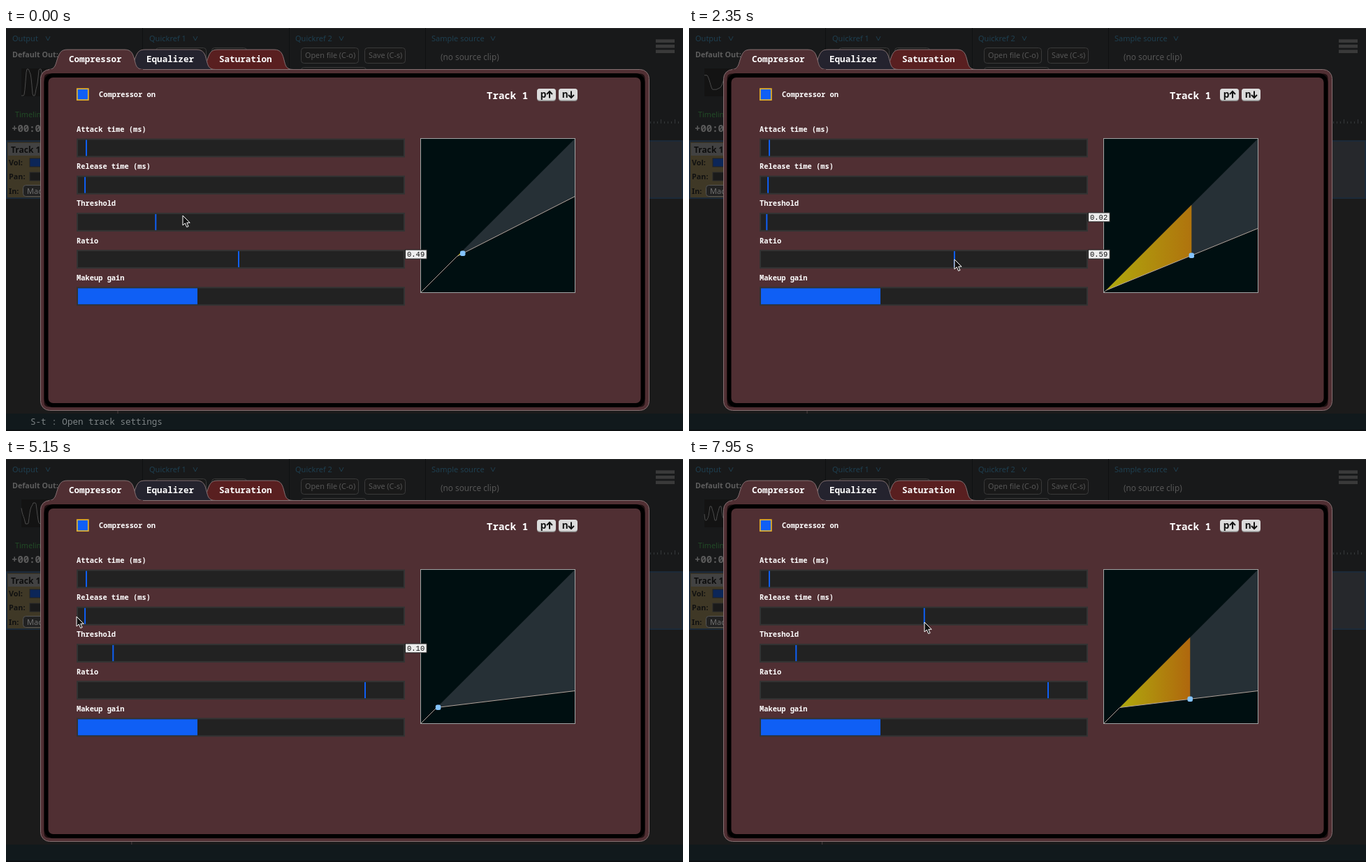
Write an HTML page that moves like this. It is 969 by 578 pixels and loops after 8 s.

```html
<!DOCTYPE html>
<html lang="en">
<head>
<meta charset="utf-8">
<title>Compressor panel</title>
<style>
html, body { margin: 0; width: 100%; height: 100%; overflow: hidden; background: #1b1b1b; }
svg { display: block; width: 100vw; height: 100vh; }
text { white-space: pre; }
.ui { font-family: "Noto Sans", "Open Sans", sans-serif; }
.mono { font-family: "Noto Sans Mono", "DejaVu Sans Mono", monospace; font-weight: 700; }
.tip { font-family: "Liberation Mono", monospace; }
</style>
</head>
<body>
<svg id="stage" viewBox="0 0 969 578" xmlns="http://www.w3.org/2000/svg"></svg>
<script>
const NS = "http://www.w3.org/2000/svg";
const stage = document.getElementById("stage");
const LOOP = 8000, STEP = 50;
const BROWN = "#502f33", BLUE = "#0f5ff5", EDGE = "#857173";

function set(node, attrs) {
  for (const k in attrs) node.setAttribute(k, attrs[k]);
  return node;
}
function add(tag, attrs, parent = stage) {
  return parent.appendChild(set(document.createElementNS(NS, tag), attrs));
}
function box(x, y, width, height, fill, more) {
  return add("rect", { x, y, width, height, fill, ...more });
}
function path(d, stroke, fill = "none", more) {
  return add("path", { d, stroke, fill, ...more });
}
function label(x, y, str, size, fill, cls = "mono", more) {
  const node = add("text", { x, y, "font-size": size, fill, class: cls, ...more });
  node.textContent = str;
  return node;
}

// Dimmed main window
box(0, 0, 969, 578, "#1b1b1b");
box(0, 0, 969, 161, "#18191a");
box(0, 0, 969, 1, "#2b2c2d");
for (const x of [195, 405, 600]) box(x, 0, 1, 60, "#0f1112");
[[9, "Output", 60], [205, "Quickref 1", 271], [414, "Quickref 2", 480], [609, "Sample source", 697]]
  .forEach(([x, name, arrow]) => {
    label(x, 19, name, 11, "#1e3f50", "ui");
    path(`M${arrow - 3} 12l3 6l3 -6`, "#1e3f50");
  });
label(9, 42, "Default Out:", 10.7, "#5e5e5e", "ui", { "font-weight": 700 });
label(622, 46, "(no source clip)", 11.8, "#565656", "ui");

function button(x, y, width, height, str) {
  box(x + .5, y + .5, width, height, "#191919", { rx: 4, stroke: "#3a3a3a" });
  if (str) label(x + 6, y + 15, str, 10.8, "#565656", "ui");
}
button(214, 28, 72, 23);
button(294, 28, 50, 23);
button(422, 28, 82, 22, "Open file (C-o)");
button(513, 28, 58, 22, "Save (C-s)");
button(422, 56, 93, 22);
for (const y of [16.3, 23.8, 31.3]) box(930, y, 27, 4.7, "#3a3a3a");

box(22, 58, 40, 40, "#131313");
const scope = path("", "#4b4b4b");
label(13, 128, "Timeline", 10.8, "#214a26", "ui");
label(8, 149, "+00:00", 14, "#5c5c5c");
for (let x = 922, i = 0; x < 967; x += 5, i++) box(x, i % 4 == 3 ? 131 : 134, 1, i % 4 == 3 ? 6 : 3, "#34383a");

// Track strip
box(1, 162, 967, 82, "#26282c", { stroke: "#1c2a39", "stroke-width": 2 });
box(2, 164, 60, 79, "#3f3826");
box(3, 165, 60, 18, "#424242");
label(7, 179, "Track 1", 12, "#0e0e0e", "ui", { "font-weight": 700 });
[["Vol:", 197], ["Pan:", 217], ["In:", 238]]
  .forEach(([s, y]) => label(4, y, s, 10.8, "#111111", "ui", { "font-weight": 700 }));
box(34, 187, 30, 12, "#0c2658", { stroke: "#222222" });
box(34, 207, 30, 12, "#1a1a1a", { stroke: "#2a2a2a" });
box(24.5, 225.5, 40, 16, "#222222", { rx: 4, stroke: "#555555" });
label(30, 238, "Mac", 11, "#707070", "ui");

// Status bar
box(0, 553, 969, 25, "#11191c");
box(0, 576, 969, 2, "#0c1012");
const playhead = box(160, 548, 1, 5, "#4d4143");
const status = label(35, 569, "S-t : Open track settings", 12.6, "#d5dadb", "mono", { style: "font-weight:500" });

// Tabs and dialog
function tab(x1, x2, fill) {
  path(`M${x1 - 13} 59.5C${x1 - 3} 59.5 ${x1 - 3} 51 ${x1} 43S${x1 + 5} 31 ${x1 + 14} 31` +
    `H${x2 - 14}C${x2 - 4} 31 ${x2 - 2} 38 ${x2} 46S${x2 + 3} 59.5 ${x2 + 13} 59.5`, EDGE, fill);
}
tab(289, 398, "#591f20");
tab(185, 287, "#24232e");
box(49.5, 59.5, 871, 489, BROWN, { rx: 13, stroke: EDGE });
tab(74, 184, BROWN);
box(62, 59, 134, 2, BROWN);
box(54.5, 65.5, 860, 478, "#1c0f10", { rx: 6 });
box(57.5, 68, 854, 473, BROWN, { rx: 10, stroke: "#000000", "stroke-width": 6 });
[[90, "Compressor"], [201, "Equalizer"], [305, "Saturation"]]
  .forEach(([x, s]) => label(x, 49, s, 12.6, "#ffffff"));

box(101.8, 87.2, 16, 16, BLUE, { stroke: "#e6b42c", "stroke-width": 1.7 });
label(133, 99, "Compressor on", 10.4, "#ffffff");
label(688, 102, "Track 1", 14.1, "#ffffff");
// Keys: letter, arrow tip and tail
[[760, "p", 91, 100.5], [791, "n", 100, 90.5]].forEach(([x, s, tip, tail]) => {
  box(x, 87, 27, 18, "#8d8d8d", { rx: 4 });
  box(x, 87, 27, 16.5, "#dcdcdc", { rx: 4 });
  label(x + 5, 100, s, 14, "#111111");
  const back = tip + Math.sign(tail - tip) * 4;
  path(`M${x + 18} ${tail}V${tip}M${x + 14} ${back}L${x + 18} ${tip}L${x + 22} ${back}`,
    "#111111", "none", { "stroke-width": 2 });
});

// Sliders
const ROWS = ["Attack time (ms)", "Release time (ms)", "Threshold", "Ratio", "Makeup gain"];
const rowY = i => 158.5 + i * 53.2;
const marks = ROWS.map((name, i) => {
  const y = rowY(i);
  label(101, y - 9.5, name, 10.4, "#ffffff");
  box(102, y + 1, 468, 25, "#222222", { stroke: "#333333", "stroke-width": 2 });
  return box(114, y + 2, 2, 23, BLUE);
});
set(marks[4], { x: 103, width: 171 });

// Transfer graph
const GX = 593.5, GY = 379.5, GS = 221;
const px = v => GX + v * GS, py = v => GY - v * GS;
const pts = list => list.map(([x, y]) => `${px(x).toFixed(2)},${py(y).toFixed(2)}`).join(" ");
const heat = add("linearGradient", { id: "heat" }, add("defs", {}));
const stops = [0, .5, 1].map(offset => add("stop", { offset }, heat));
box(GX, GY - GS, GS, GS, "#000f11");
const wedge = add("polygon", { fill: "#263036" });
const cut = add("polygon", { fill: "url(#heat)" });
const curve = add("polyline", { fill: "none", stroke: "#b3a49c" });
box(GX, GY - GS, GS, GS, "none", { stroke: "#a0a3a3" });
const dot = box(0, 0, 7.5, 7.5, "#84c4ff", { rx: 2.5 });

const tips = [1, 2, 3].map(i => {
  const y = rowY(i) - .5;
  return {
    bg: box(571.5, y + .5, 31, 13, "#ededed", { stroke: "#222222" }),
    text: label(574, y + 10.5, "", 10.5, "#111111", "tip")
  };
});
const pointer = path("M0 0V14L3.3 11L5.7 16.5L8.1 15.5L5.8 10.3H10.2Z", "#ffffff", "#111111", { "stroke-linejoin": "round" });

// Motion: [seconds, value, ...]
const CURSOR = [[0, 253, 269], [.25, 215, 275], [1.3, 106, 276], [1.5, 108, 275], [1.6, 111, 276],
  [2.1, 333, 328], [2.85, 514, 343], [3.15, 515, 360], [3.6, 111, 281], [4.1, 138, 284],
  [4.3, 153, 283], [4.55, 153, 281], [5.15, 101, 226], [5.4, 113, 228], [6.5, 338, 235], [7.95, 337, 234]];
const THRESH = [[.25, 214, .235], [1.3, 107, .01], [1.5, 109, .02], [1.6, 111, .02],
  [3.6, 111, .02], [4.1, 133, .07], [4.3, 153, .103]];
const RATIO = [[2.1, 333], [2.85, 514]];
const RELEASE = [[5.4, 42], [6.5, 972.62], [6.65, 1002]];
const WAVE = [[0, 19], [1.5, 17], [3.15, 4], [4.1, 5], [5.15, 15], [6.5, 18], [7.95, 10]];
const HITS = [[-.35, .7], [.45, .6], [.95, .72], [1.45, .74], [2.25, .7], [3.45, .55], [3.95, .71],
  [4.2, .6], [5.35, .7], [5.9, .62], [6.45, .684], [7, .6], [7.4, .7], [7.85, .686]];

function at(keys, t, col = 1) {
  if (t <= keys[0][0]) return keys[0][col];
  for (let i = 1; i < keys.length; i++) {
    const a = keys[i - 1], b = keys[i];
    if (t <= b[0]) {
      const u = (t - a[0]) / (b[0] - a[0]);
      return a[col] + (b[col] - a[col]) * u * u * (3 - 2 * u);
    }
  }
  return keys[keys.length - 1][col];
}
const level = t => .1 + Math.max(...HITS.map(([h, a]) => t < h ? 0 : a * Math.exp((h - t) / .25)));

function showTip(tip, on, value) {
  const str = value.toFixed(2), display = on ? "inline" : "none";
  set(tip.bg, { width: str.length * 6.3 + 5.5, display });
  set(tip.text, { display }).textContent = str;
}

function drawScope(t) {
  const amp = at(WAVE, t), f = .37 + .2 * Math.sin(t * 1.9);
  let d = "";
  for (let x = 22; x <= 52; x++) {
    const s = 1.25 * Math.sin((x - 22) * f + t * 7 - 2.1) + .25 * Math.sin((x - 22) * f * 2.7 + t * 13);
    d += `${d ? "L" : "M"}${x} ${(78 - Math.max(-1, Math.min(1, s)) * amp).toFixed(1)}`;
  }
  set(scope, { d });
}

function drawGraph(t, thr, ratio) {
  const out = v => v < thr ? v : thr + (v - thr) * (1 - ratio);
  const sig = level(t), y = out(sig), gap = Math.max(0, sig - y) * GS;
  set(wedge, { points: pts([[thr, thr], [1, 1], [1, out(1)]]) });
  set(cut, { points: sig > thr ? pts([[thr, thr], [sig, sig], [sig, y]]) : "" });
  stops.forEach((s, i) => set(s, { "stop-color": `hsl(${58 - .28 * gap * i / 2} 86% 37%)` }));
  set(curve, { points: pts([[0, 0], [thr, thr], [1, out(1)]]) });
  set(dot, { x: px(sig) - 3.75, y: py(y) - 3.75 });
}

function draw(ms) {
  const t = Math.floor(ms / STEP) * STEP / 1000;
  const tx = at(THRESH, t), rx = at(RATIO, t), rel = at(RELEASE, t);
  set(marks[1], { x: 102.3 + rel * 466 / 2000 });
  set(marks[2], { x: tx - .7 });
  set(marks[3], { x: rx - 1 });
  showTip(tips[0], t > 5.4 && t < 7.9, rel);
  showTip(tips[1], t > .25 && t < 3 || t > 3.6 && t < 5.7, at(THRESH, t, 2));
  showTip(tips[2], t < .6 || t > 2.1 && t < 4.25, (rx - 104.5) / 466);
  drawGraph(t, (tx - 104.5) / 466, (rx - 104.5) / 466);
  drawScope(t);
  set(pointer, { transform: `translate(${at(CURSOR, t, 1)} ${at(CURSOR, t, 2)})` });
  set(playhead, { x: 159.5 + t * 3.85 });
  set(status, { opacity: t < 1.75 ? .55 - .24 * t : 0 });
}

function tick() {
  draw(performance.now() % LOOP);
  requestAnimationFrame(tick);
}
tick();
</script>
</body>
</html>
```
